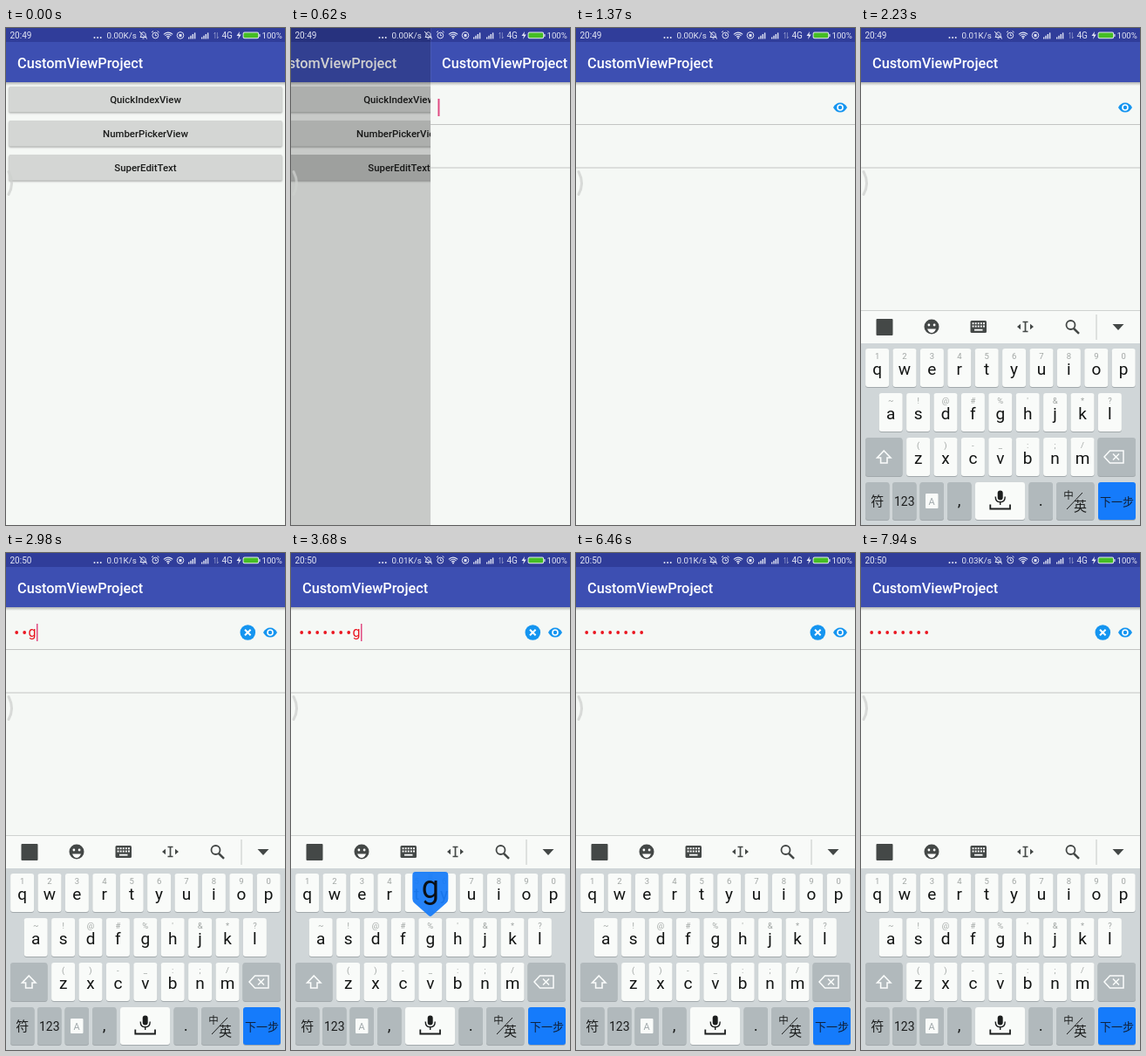
These frames come from a looping animation (320 px wide and 569 px high, 7990 ms). An HTML page with a canvas:

```html
<!DOCTYPE html>
<html lang="en">
<head>
<meta charset="utf-8">
<title>CustomViewProject</title>
<style>
html, body { margin: 0; width: 100%; height: 100%; overflow: hidden; background: #f5f8f5; }
canvas { display: block; width: 100vw; height: 100vh; }
</style>
</head>
<body>
<canvas id="stage"></canvas>
<script>
const W = 320, H = 569, LOOP = 7990;
const SANS = 'Roboto, sans-serif';
const CJK = '"Noto Sans CJK SC", "Noto Sans CJK", sans-serif';
const INK = '#444847', BLUE = '#1595f0', PAGE = '#f5f8f5';

const canvas = document.getElementById('stage');
const dpr = window.devicePixelRatio || 1;
canvas.width = W * dpr;
canvas.height = H * dpr;
const c = canvas.getContext('2d');

const PRESS = 430, SLIDE = 520, SLIDE_MS = 345;
const KB_START = 1640, KB_MS = 240;
const TYPED = 'dfghfdfg', TYPE_START = 2560, TYPE_GAP = 155;
const LAST_KEY = TYPE_START + TYPE_GAP * (TYPED.length - 1);
const POPUP_MS = 110, REVEAL_MS = 1500, BLINK = 550;

const ROWS = [
  { keys: 'qwertyuiop', hints: '1234567890', x: 18.6, y: 367 },
  { keys: 'asdfghjkl', hints: "~!@#%'&*?", x: 34.2, y: 418 },
  { keys: 'zxcvbnm', hints: '()-_:;/', x: 65.6, y: 469 }
];
const PITCH = 31.4, KEY_W = 27, KEY_H = 44;

const clamp = v => Math.max(0, Math.min(1, v));
const easeOut = u => 1 - (1 - u) ** 2;

function box(x, y, w, h, color, r = 0) {
  c.fillStyle = color;
  c.beginPath();
  c.roundRect(x, y, w, h, r);
  c.fill();
}

function text(s, x, y, size, color, align = 'left', weight = 400, family = SANS) {
  c.font = `${weight} ${size}px ${family}`;
  c.textAlign = align;
  c.fillStyle = color;
  c.fillText(s, x, y);
}

function disc(x, y, r, color) {
  c.fillStyle = color;
  c.beginPath();
  c.arc(x, y, r, 0, Math.PI * 2);
  c.fill();
}

function ring(x, y, r, color, width, from = 0, to = Math.PI * 2) {
  c.strokeStyle = color;
  c.lineWidth = width;
  c.beginPath();
  c.arc(x, y, r, from, to);
  c.stroke();
}

function path(d, color, width) {
  const p = new Path2D(d);
  if (width) {
    c.strokeStyle = color;
    c.lineWidth = width;
    c.stroke(p);
  } else {
    c.fillStyle = color;
    c.fill(p);
  }
}

function at(x, draw) {
  c.save();
  c.translate(x, 0);
  draw();
  c.restore();
}

function header() {
  box(0, 0, W, H, PAGE);
  const g = c.createLinearGradient(0, 62, 0, 66);
  g.addColorStop(0, 'rgba(0,0,0,.28)');
  g.addColorStop(1, 'rgba(0,0,0,0)');
  box(0, 62, W, 4, g);
  box(0, 0, W, 16, '#303d9a');
  box(0, 16, W, 46, '#3d4fb2');
  text('CustomViewProject', 13, 45.8, 16.3, '#fff', 'left', 500);
}

function menuPage(pressed) {
  header();
  ['QuickIndexView', 'NumberPickerView', 'SuperEditText'].forEach((label, i) => {
    const y = 66.9 + 39.1 * i;
    c.save();
    c.shadowColor = 'rgba(0,0,0,.3)';
    c.shadowBlur = 2 * dpr;
    c.shadowOffsetY = 1.3 * dpr;
    box(3.2, y, 313.6, 29.4, pressed && i === 2 ? '#c2c4c2' : '#d4d6d4', 1.6);
    c.restore();
    text(label, 160, y + 19, 11.4, '#1b1c1b', 'center', 500);
  });
}

function eye() {
  path('M295 91Q298 85.5 303 85.5T311 91Q308 96.5 303 96.5T295 91Z', BLUE);
  disc(303, 91, 3.8, '#fff');
  disc(303, 91, 2.2, BLUE);
}

function clearButton() {
  disc(277.3, 91, 8.8, BLUE);
  path('M274 87.7L280.6 94.3M280.6 87.7L274 94.3', '#fff', 2);
}

function cursorOn(t) {
  const start = t >= LAST_KEY ? LAST_KEY : t >= TYPE_START ? t : t >= KB_START ? KB_START - 40 : 560;
  return Math.floor((t - start) / BLINK) % 2 === 0;
}

function editPage(t) {
  header();
  box(0, 110, W, 1, '#c3c5c3');
  box(0, 159.4, W, 1, '#c3c5c3');
  const count = t < TYPE_START ? 0
    : Math.min(TYPED.length, Math.floor((t - TYPE_START) / TYPE_GAP) + 1);
  const lastAt = TYPE_START + TYPE_GAP * (count - 1);
  const shown = count > 0 && t - lastAt < REVEAL_MS;
  for (let i = 0; i < count - (shown ? 1 : 0); i++) disc(12.2 + 9 * i, 91, 1.9, '#ea1520');
  if (shown) text(TYPED[count - 1], 7.6 + 9 * (count - 1), 96, 16, '#ea1520');
  if (cursorOn(t)) box(count ? 8 + 9 * count : 8.4, 81, count ? 1.5 : 2, 20, '#e04a82');
  if (count) clearButton();
  eye();
}

function statusBar(t) {
  const ink = '#e4e7f5';
  text(t < 2500 ? '20:49' : '20:50', 4.5, 12, 10, ink);
  for (let i = 0; i < 3; i++) disc(101.5 + 3.6 * i, 11, 1, ink);
  const speed = t < 1900 ? '0.00' : t < 6500 ? '0.01' : '0.03';
  text(speed + 'K/s', 115.5, 12, 9.8, ink);
  // bell, alarm
  path('M154 10.5H161L160 9V6.5Q157.5 3 155 6.5V9ZM156.5 12H158.5M153 4L162 12.5', ink, 1);
  ring(171.3, 8.5, 3.4, ink, 1);
  path('M171.3 6.5V8.7H173M167 5L169 3.5M175.6 5L173.6 3.5', ink, 1);
  // wifi, lock ring
  for (let r = 2.5; r < 8; r += 2.2) ring(186, 12, r, ink, 1.1, -2.4, -.74);
  disc(186, 11.6, 1, ink);
  ring(200, 8.4, 3.8, ink, 1);
  box(198.5, 7, 3, 3, ink);
  // signal bars
  for (const x of [209, 224])
    for (let i = 0; i < 4; i++) box(x + 2.3 * i, 10.5 - 1.7 * i, 1.4, 1.9 + 1.7 * i, ink);
  path('M239.8 12V5L238.5 7M242.4 5V12L243.7 10', 'rgba(228,231,245,.45)', .9);
  text('4G', 247.5, 12.2, 10, ink);
  path('M268 4L264.5 9H267L266 13L269.8 7.6H267.4Z', ink);
  box(271.6, 4.6, 18.5, 7.6, ink, 2);
  box(272.5, 5.5, 16.7, 5.8, '#45bd25', 1.3);
  box(290.3, 7, 1.2, 3, ink);
  text('100%', 293.5, 12, 9.6, ink);
}

function edgeHandle(alpha) {
  c.lineCap = 'round';
  path('M3 164.5Q10 178 3 190.5', `rgba(205,208,206,${alpha})`, 3);
  c.lineCap = 'butt';
}

function key(x, y, w, color, h = KEY_H) {
  box(x, y + 1, w, h, '#a2a9ac', 3);
  box(x, y, w, h, color, 3);
}

function toolbar() {
  box(0, 323, W, 38, '#f8faf8');
  box(0, 323, W, 1, '#cfd2d0');
  box(17.5, 333, 19, 19, INK, 1);
  // smiley
  disc(81, 342, 8.5, INK);
  disc(77.9, 340, 1.4, '#fff');
  disc(84.1, 340, 1.4, '#fff');
  path('M76 344.5H86Q84 349 81 349T76 344.5Z', '#fff');
  // keyboard
  box(125.5, 335, 18.5, 14, INK, 1.5);
  for (let r = 0; r < 2; r++)
    for (let i = 0; i < 5; i++) box(127.6 + 3.1 * i, 337.3 + 3.3 * r, 1.9, 1.9, '#fff');
  box(130, 344.8, 9.5, 1.8, '#fff');
  // text cursor
  path('M185.5 336.5H191.5M185.5 347.5H191.5M188.5 336.5V347.5', INK, 1.7);
  path('M183 338.8V345.2L179 342ZM194 338.8V345.2L198 342Z', INK);
  // search, divider, fold
  ring(240.5, 340, 5, INK, 1.8);
  path('M244 344L250 349.8', INK, 2.5);
  box(269.5, 328, 1, 29, '#c4c8c6');
  path('M288.5 339H301.5L295 346Z', INK);
}

function bottomRow() {
  const y = 520, gray = '#b1b9bc', white = '#f9fbf9', ink = '#1c1e1e';
  for (const x of [5, 36, 67.5, 99, 192.5]) key(x, y, 27.5, gray, 43);
  text('符', 18.7, 547, 15, ink, 'center', 400, CJK);
  text('123', 49.7, 546.5, 14, ink, 'center');
  box(74, 533, 14.5, 17, white, 1);
  text('A', 81.2, 546, 11, '#a0a8ab', 'center');
  text(',', 112.7, 547, 19, ink, 'center');
  text('.', 206.2, 547, 19, ink, 'center');
  key(131, y, 57, white, 43);
  box(156.7, 529.5, 6, 11, ink, 3);
  path('M154.2 536.5Q154.2 542.8 159.7 542.8T165.2 536.5M159.7 543V546', ink, 1.4);
  path('M148.3 545.5V550.5H171V545.5', ink, 1.8);
  key(224, y, 43.5, gray, 43);
  text('中', 238, 539, 11.5, ink, 'center', 400, CJK);
  text('英', 251.5, 552.5, 15, ink, 'center', 400, CJK);
  path('M236 551L254 532', ink, 1);
  key(272, y, 43, '#157bfb', 43);
  text('下一步', 293.5, 546.5, 13, '#10203a', 'center', 400, CJK);
}

function keyboard() {
  box(0, 361, W, 208, '#d0d6d8');
  toolbar();
  for (const row of ROWS) {
    [...row.keys].forEach((ch, i) => {
      const x = row.x + PITCH * i;
      key(x - KEY_W / 2, row.y, KEY_W, '#f9fbf9');
      text(row.hints[i], x, row.y + 12, 9.5, '#a0a5a3', 'center');
      text(ch, x, row.y + 29.5, 19, '#121413', 'center');
    });
  }
  key(5, 469, 42.5, '#b1b9bc');
  path('M26.3 484L34 492H30V498H22.6V492H18.6Z', '#fafcfb', 1.6);
  key(271.5, 469, 43.5, '#b1b9bc');
  path('M279 491L285.5 484H301V498H285.5Z', '#fafcfb', 1.5);
  path('M289 487.5L296 494.5M296 487.5L289 494.5', '#fafcfb', 1.5);
  bottomRow();
}

function popup(t) {
  const i = Math.floor((t - TYPE_START) / TYPE_GAP);
  if (i < 0 || i >= TYPED.length || t - TYPE_START - i * TYPE_GAP > POPUP_MS) return;
  const ch = TYPED[i];
  const row = ROWS.find(r => r.keys.includes(ch));
  const x = row.x + PITCH * row.keys.indexOf(ch);
  c.save();
  c.translate(x, row.y - 53);
  path('M-17 0H17Q20.5 0 20.5 4V31Q20.5 34 18 36L2 50Q0 52 -2 50L-18 36Q-20.5 34 -20.5 31V4Q-20.5 0 -17 0Z',
    'rgba(24,124,248,.94)');
  text(ch, 0, 30, 36, '#0b1118', 'center');
  c.restore();
}

function draw(t) {
  c.setTransform(canvas.width / W, 0, 0, canvas.height / H, 0, 0);
  const p = easeOut(clamp((t - SLIDE) / SLIDE_MS));
  if (p < 1) {
    at(-72 * p, () => menuPage(t >= PRESS));
    box(0, 0, W, H, `rgba(0,0,0,${.365 * p})`);
  }
  if (p > 0) at(W * (1 - p), () => editPage(t));
  statusBar(t);
  edgeHandle(.75);
  const k = easeOut(clamp((t - KB_START) / KB_MS));
  if (k > 0) {
    c.save();
    c.translate(0, 246 * (1 - k));
    keyboard();
    popup(t);
    c.restore();
  }
}

const start = performance.now();
function tick() {
  draw((performance.now() - start) % LOOP);
  requestAnimationFrame(tick);
}
tick();
</script>
</body>
</html>
```
